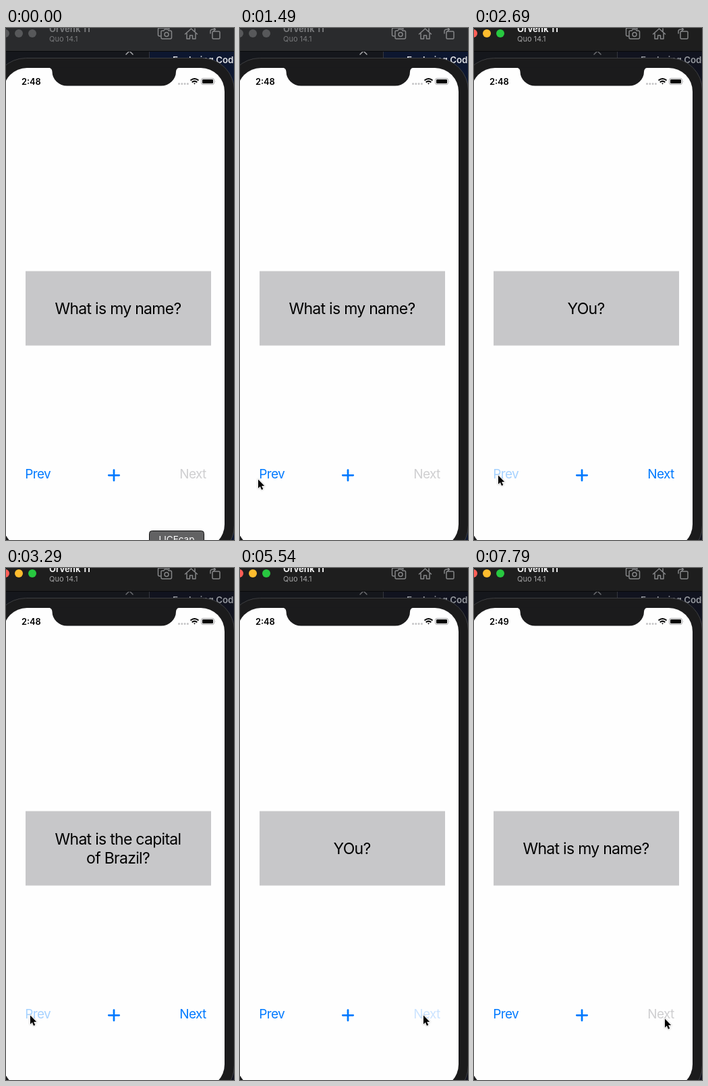
An HTML page for the animation above (8 s loop, 338x757 px).

```html
<!DOCTYPE html>
<html lang="en">
<head>
<meta charset="utf-8">
<title>Flash cards</title>
<style>
  html, body { margin: 0; width: 100%; height: 100%; overflow: hidden; background: #10141c; }
  svg { display: block; width: 338px; height: 757px; font-family: Inter, "Liberation Sans", sans-serif; }
  .card { font-size: 23px; letter-spacing: -.031em; text-anchor: middle; }
  .button { font-size: 19px; letter-spacing: -.033em; }
  .icon { fill: none; stroke: #858688; stroke-width: 1.5; stroke-linejoin: round; stroke-linecap: round; }
</style>
</head>
<body>
<svg viewBox="0 0 338 757">
  <!-- windows behind the phone -->
  <rect width="213" height="757" fill="#15171c"/>
  <rect id="editor" x="213" width="125" height="757"/>
  <path d="M212.5 34V50" stroke="#34363d"/>
  <path id="chevron" class="icon" d="M178 39l5-5 5 5"/>
  <text id="behind" x="247" y="52" font-size="13.300" font-weight="600">Exploring Code</text>

  <!-- simulator title bar -->
  <rect id="bar" width="338" height="34"/>
  <path d="M0 34.5H338" stroke="#08090b"/>
  <g id="lights">
    <circle cx="-1" cy="8" r="6"/><circle cx="19" cy="8" r="6"/><circle cx="39" cy="8" r="6"/>
  </g>
  <text id="title" x="64" y="6" font-size="13" font-weight="700">Orvenk 11</text>
  <text id="subtitle" x="64" y="20" font-size="11">Quo 14.1</text>
  <g class="icon">
    <path d="M229 12h-1.500q-2 0-2-2V2q0-2 2-2H240q2 0 2 2"/>
    <path d="M231 4h3l1-2h5l1 2h2.500q2 0 2 2v8q0 2-2 2H232q-2 0-2-2V5z"/>
    <circle cx="238" cy="9.500" r="3"/>
    <path d="M265.500 9L274.500 1l9 8M268 8v8h4.500v-5h4v5h4.500V8M280 5V1"/>
    <rect x="306" y="5" width="11" height="11" rx="1.500"/>
    <path d="M303 8V5q0-3 4-3h3M307.500 -1l3 3-3 3"/>
  </g>

  <!-- phone -->
  <rect x="-18.500" y="44.500" width="357" height="739" rx="48" fill="#1b1b1c" stroke="#3d3e41"/>
  <rect x="-4" y="59" width="328" height="710" rx="35" fill="#fefefe"/>
  <path d="M62 58.500a6 6 0 0 1 6.500 6a22 21 0 0 0 22 21H230a22 21 0 0 0 22-21a6 6 0 0 1 6.500-6z" fill="#1b1b1c"/>
  <text id="clock" x="23" y="84" font-size="12.800" font-weight="600"></text>
  <path d="M256.500 82.500h14" stroke="#c4c4c6" stroke-width="3" stroke-linecap="round" stroke-dasharray="0 4.300"/>
  <g fill="none" stroke="#000" stroke-width="2">
    <path d="M273.500 77.500q6-5 12 0M275.700 80.200q3.800-3.200 7.600 0"/>
    <path d="M278 81.500h3l-1.500 2z" fill="#000" stroke="none"/>
  </g>
  <rect x="289.500" y="74.500" width="19" height="9" rx="2.500" fill="none" stroke="#a5a5a7"/>
  <rect x="291" y="76" width="16" height="6" rx="1.300"/>
  <path d="M310 77.500q1.200 1.500 0 3z" fill="#a5a5a7"/>

  <rect x="29" y="359.500" width="275" height="110" fill="#c7c7c9"/>
  <text class="card" id="line1" x="166"></text>
  <text class="card" id="line2" x="166" y="437.300"></text>
  <text class="button" id="prev" x="28.300" y="666.300">Prev</text>
  <text class="button" id="next" x="257.300" y="666.300">Next</text>
  <path d="M152.300 661.300h15.400M160 653.600v15.400" stroke="#007aff" stroke-width="2.800" stroke-linecap="round"/>

  <g id="tooltip">
    <rect x="212.500" y="743.500" width="81" height="24" rx="4" fill="#626263" stroke="#111"/>
    <text x="253" y="761" font-size="13.500" fill="#fff" text-anchor="middle">LICEcap</text>
  </g>
  <path id="cursor" d="M0 .5V13.500l2.900-2.700 2.100 4.900 2.200-.9-2.100-4.800h4z"
        stroke="#fff" stroke-width="1.300" paint-order="stroke"
        style="filter:drop-shadow(.3px .8px .8px #0005)"/>
</svg>
<script>
const LOOP = 8000;
const BLUE = '#007aff', PRESSED = '#cce4ff', FADING = '#a6d2ff', NEARLY = '#66afff';
const NEXT_OFF = '#cfcfd1', PREV_OFF = '#a9a9ab';
const NAME = ['What is my name?'], WHO = ['Who?'], YOU = ['YOu?'];
const CAPITAL = ['What is the capital', 'of Brazil?'];

// Each entry changes part of the state from its time on.
const steps = [
  [0, { active: false, tooltip: true, clock: '2:48', card: NAME, prev: BLUE, next: NEXT_OFF, cursor: [253, 780] }],
  [900, { tooltip: false, cursor: [226, 752] }],
  [1040, { cursor: [130, 722] }],
  [1190, { cursor: [38, 692] }],
  [1340, { cursor: [8, 676] }],
  [1490, { cursor: [27, 667] }],
  [1640, { cursor: [31, 665] }],
  [1790, { cursor: [34, 663] }],
  [1940, { cursor: [36, 661] }],
  [2090, { active: true, prev: PRESSED }],
  [2240, { card: WHO, prev: FADING, next: BLUE }],
  [2390, { prev: BLUE }],
  [2690, { card: YOU, prev: FADING }],
  [2840, { prev: BLUE }],
  [3290, { card: CAPITAL, prev: FADING }],
  [3440, { prev: BLUE }],
  [3590, { prev: PRESSED }],
  [3740, { prev: '#d4d6da' }],
  [3890, { prev: PREV_OFF }],
  [4190, { cursor: [152, 668] }],
  [4340, { cursor: [257, 671] }],
  [4490, { cursor: [268, 664] }],
  [4640, { cursor: [272, 660] }],
  [4940, { next: PRESSED, cursor: [272, 661] }],
  [5090, { next: NEARLY, prev: BLUE }],
  [5240, { next: PRESSED }],
  [5540, { card: YOU }],
  [5840, { card: WHO, next: BLUE }],
  [6140, { next: PRESSED }],
  [6440, { card: NAME, next: FADING }],
  [6590, { next: '#d8dade' }],
  [6740, { next: NEXT_OFF }],
  [7190, { cursor: [278, 668] }],
  [7340, { cursor: [286, 682] }],
  [7490, { cursor: [288, 678], clock: '2:49' }],
  [7640, { cursor: [285, 670] }],
  [7790, { cursor: [283, 666] }]
];

const el = id => document.getElementById(id);
const fill = (node, color) => node.setAttribute('fill', color);
const lightColors = ['#ff5f57', '#febc2e', '#28c840'];

function stateAt(time) {
  return Object.assign({}, ...steps.filter(([start]) => start <= time).map(([, change]) => change));
}

function draw(time) {
  const s = stateAt(time);
  fill(el('bar'), s.active ? '#1e1e1e' : '#2a2b2d');
  fill(el('title'), s.active ? '#f2f2f2' : '#77787a');
  fill(el('subtitle'), s.active ? '#a2a2a3' : '#77787a');
  fill(el('editor'), s.active ? '#11131f' : '#0d1730');
  fill(el('behind'), s.active ? '#96999f' : '#e0e2e6');
  el('chevron').style.stroke = s.active ? '#6b6c70' : '#a9aaad';
  [...el('lights').children].forEach((light, i) => fill(light, s.active ? lightColors[i] : '#57585a'));

  el('clock').textContent = s.clock;
  el('line1').textContent = s.card[0];
  el('line1').setAttribute('y', s.card.length > 1 ? 409.3 : 423.3);
  el('line2').textContent = s.card[1] || '';
  fill(el('prev'), s.prev);
  fill(el('next'), s.next);
  el('tooltip').setAttribute('visibility', s.tooltip ? 'visible' : 'hidden');
  el('cursor').setAttribute('transform', `translate(${s.cursor})`);
}

const begin = performance.now();
function tick() {
  draw((performance.now() - begin) % LOOP);
  requestAnimationFrame(tick);
}
tick();
</script>
</body>
</html>
```
